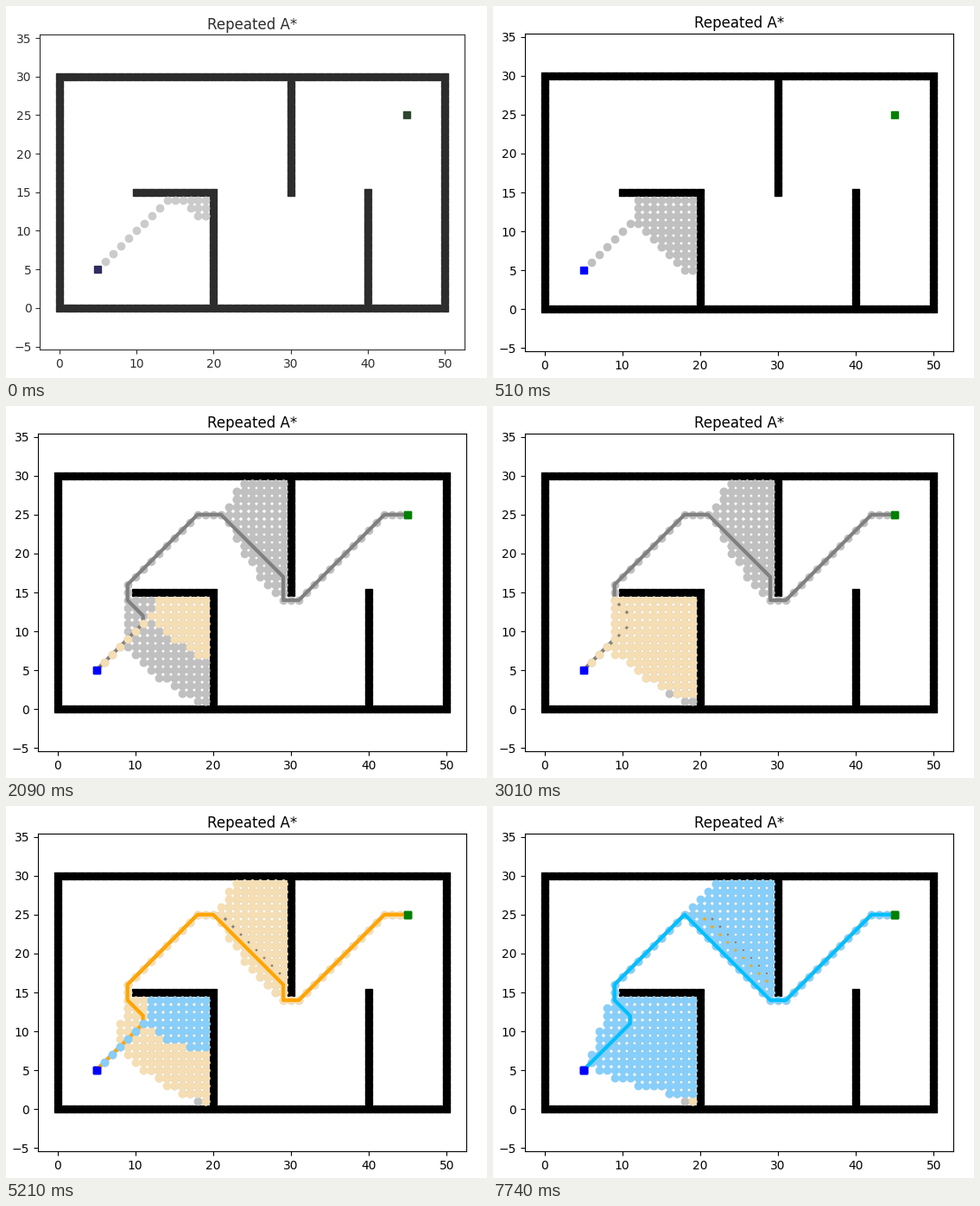
These frames come from a looping animation (557x431 px, 8000 ms). A matplotlib script:

```python
import math

import numpy as np
import matplotlib.pyplot as plt
from matplotlib.animation import FuncAnimation
from matplotlib.patches import Rectangle

WIDTH, HEIGHT, DPI = 557, 431, 100
LOOP_MS, STEP_MS = 8000, 25
START, GOAL = (5, 5), (45, 25)
MOVES = [(-1, 0), (-1, 1), (0, 1), (1, 1), (1, 0), (1, -1), (0, -1), (-1, -1)]

WALLS = {(x, y) for x in range(51) for y in (0, 30)}
WALLS |= {(x, y) for x in (0, 50) for y in range(31)}
WALLS |= {(x, 15) for x in range(10, 21)}
WALLS |= {(20, y) for y in range(15)}
WALLS |= {(30, y) for y in range(15, 30)}
WALLS |= {(40, y) for y in range(16)}

# Heuristic weight, dot colour, path colour, (step, ms) knots; step -1 is the path.
RUNS = [
    (2.5, "silver", "gray", [(0, 0), (1, 110), (5, 510), (6, 610), (-1, 1070)]),
    (2.0, "wheat", "orange",
     [(0, 1710), (3, 2090), (4, 2240), (7, 2650), (8, 2830), (-1, 3720)]),
    (1.5, "lightskyblue", "deepskyblue",
     [(0, 4450), (2, 4780), (3, 5210), (4, 5570), (8, 6490), (9, 6720),
      (12, 7560), (-1, 7740)]),
]
# Fade and shrink of the window while it opens: start in ms, amount.
OPENING = [(0, 0.18), (50, 0.08), (75, 0.03), (100, 0.0)]


def blocked(a, b):
    return b in WALLS or (a[0], b[1]) in WALLS or (b[0], a[1]) in WALLS


def weighted_astar(weight):
    """Return the cells in order of expansion and the path from goal to start."""
    def score(cell):
        return cost[cell] + weight * math.dist(cell, GOAL)

    cost, parent, closed = {START: 0}, {}, []
    frontier = [(score(START), START)]
    while frontier:
        best = min(frontier)
        frontier.remove(best)
        cell = best[1]
        closed.append(cell)
        if cell == GOAL:
            break
        for dx, dy in MOVES:
            nxt = (cell[0] + dx, cell[1] + dy)
            new_cost = cost[cell] + 1
            if not blocked(cell, nxt) and new_cost < cost.get(nxt, math.inf):
                cost[nxt] = new_cost
                parent[nxt] = cell
                frontier.append((score(nxt), nxt))
    path = [GOAL]
    while path[-1] != START:
        path.append(parent[path[-1]])
    return closed[1:-1], path


def batch_counts(total):
    """Number of dots on show after each redraw; batches grow by thirds."""
    counts = []
    for k in range(1, total + 1):
        size = 20 if k < total / 3 else 30 if k < total * 2 / 3 else 40
        if k % size == 0:
            counts.append(k)
    return counts + [total]


fig = plt.figure(figsize=(WIDTH / DPI + 1e-8, HEIGHT / DPI + 1e-8), dpi=DPI)
LEFT, BOTTOM, AX_W, AX_H = 37, 31, 496, 368
ax = fig.add_axes([0, 0, 1, 1])
ax.set_title("Repeated A*", pad=5)
ax.set_xlim(-2.5, 52.5)
half_height = 27.5 * AX_H / AX_W
ax.set_ylim(15 - half_height, 15 + half_height)


def draw_ends():
    return [ax.plot(*START, "bs")[0], ax.plot(*GOAL, "gs")[0]]


ends = draw_ends()
ax.plot(*zip(*sorted(WALLS)), "sk")

runs = []
for weight, dot_color, path_color, knots in RUNS:
    cells, path = weighted_astar(weight)
    counts = batch_counts(len(cells))
    last = len(counts)
    steps = [last if s < 0 else s for s, _ in knots]
    times = np.interp(range(last + 1), steps, [t for _, t in knots])
    dots, = ax.plot([], [], "o", color=dot_color)
    line, = ax.plot(*zip(*path), color=path_color, linewidth=3)
    runs.append((np.array(cells), counts, times, dots, [line] + draw_ends()))

veil = fig.add_artist(Rectangle((0, 0), 1, 1, transform=fig.transFigure,
                                color="white", linewidth=0, zorder=100))


def open_window(fade):
    scale = 1 - 0.05 * fade
    x = 285 + (LEFT - 285) * scale
    y = 236 + (BOTTOM - 236) * scale
    ax.set_position([x / WIDTH, y / HEIGHT,
                     AX_W * scale / WIDTH, AX_H * scale / HEIGHT])
    veil.set_alpha(fade)
    dim = 1 - 4.25 * fade
    ends[0].set_color((0, 0, dim))
    ends[1].set_color((0, 0.5 * dim, 0))


def update(frame):
    now = frame * STEP_MS + STEP_MS - 1
    open_window([fade for t, fade in OPENING if t <= now][-1])
    for cells, counts, times, dots, finish in runs:
        done = int(np.sum(times <= now))
        shown = counts[min(done, len(counts)) - 1] if done else 0
        dots.set_data(cells[:shown, 0], cells[:shown, 1])
        for artist in finish:
            artist.set_visible(done > len(counts))


anim = FuncAnimation(fig, update, frames=LOOP_MS // STEP_MS,
                     interval=STEP_MS, repeat=True)
plt.show()
```
